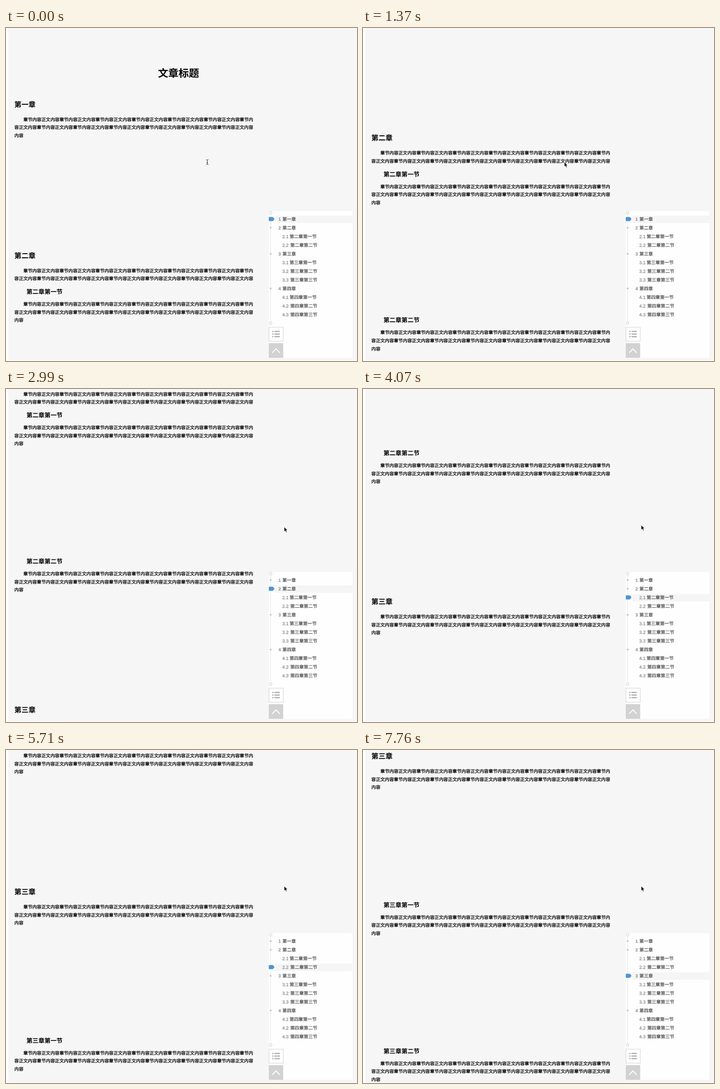
Recreate the animation shown at these times as an HTML page. Size 768 by 729 pixels, loop 8000 ms.

```html
<!DOCTYPE html>
<html lang="zh-CN">
<head>
<meta charset="utf-8">
<style>
html, body { margin: 0; width: 100%; height: 100%; overflow: hidden; background: #fff; }
svg { display: block; width: 768px; height: 729px; }
text { font-family: "Noto Sans CJK SC", "Noto Sans CJK JP", sans-serif; text-rendering: geometricPrecision; white-space: pre; }
.num { font-family: "Liberation Sans", Arial, sans-serif; }
</style>
</head>
<body>
<svg id="stage" viewBox="0 0 768 729" lang="zh-CN">
  <rect x="5" width="763" height="728" fill="#f6f6f6"/>
  <g id="page"></g>
  <rect x="575" y="401" width="183" height="321" fill="#fefefe"/>
  <g id="active">
    <rect x="589" y="-7.5" width="169" height="15.5" fill="#f5f5f5"/>
    <path d="M589 7.8H758" stroke="#ececec" stroke-width=".7"/>
  </g>
  <path d="M579 405V646" stroke="#e2e2e2"/>
  <g fill="#fff" stroke="#c8c8c8"><circle cx="579" cy="404.5" r="3"/><circle cx="579" cy="646" r="3"/></g>
  <g id="toc"></g>
  <path id="marker" d="M576 -4.5H584L587.7 0L584 4.5H576Q575 4.5 575 3.5V-3.5Q575 -4.5 576 -4.5Z" fill="#5094d5"/>
  <rect x="575.5" y="655" width="31" height="30.5" fill="#fff" stroke="#d0d0d0"/>
  <path d="M582.5 664.3h3m2 0h11.5M582.5 670h3m2 0h11.5M582.5 675.7h3m2 0h11.5" stroke="#aaa" stroke-width="2.6"/>
  <rect x="575" y="690" width="31.5" height="32" fill="#d2d2d2"/>
  <path d="M582.5 711L590.7 702.5L599 711" fill="none" stroke="#fff" stroke-width="2"/>
  <path id="beam" d="M-2.5 -5.3Q0 -5.3 0 -4Q0 -5.3 2.5 -5.3M0 -4.5V4.5M-2.5 5.3Q0 5.3 0 4Q0 5.3 2.5 5.3M-1.5 1.5H1.5" fill="none" stroke="#222"/>
  <path id="arrow" d="M0 0V10.5L2.4 8.3L4.2 12.3L6 11.5L4.3 7.6H7.6Z" fill="#000" stroke="#fff" stroke-width=".9"/>
</svg>
<script>
const LOOP = 8000, EM = 9.87, LINE = 17.6, BLANK = 228.9;
const $ = id => document.getElementById(id);

function add(parent, tag, attrs, content = '') {
  const el = document.createElementNS('http://www.w3.org/2000/svg', tag);
  for (const k in attrs) el.setAttribute(k, attrs[k]);
  el.textContent = content;
  return parent.appendChild(el);
}

// Text is placed by the vertical centre of its glyphs; regular weight gets a hairline to look fuller.
const label = (parent, x, y, size, bold, fill, str, extra) => add(parent, 'text', {
  x, y: y + size * 0.38, 'font-size': size, 'font-weight': bold ? 700 : 500,
  fill, stroke: fill, 'stroke-width': bold ? 0 : 0.3, ...extra
}, str);

const digits = '零一二三四';
const name = (c, s) => `第${digits[c]}章` + (s ? `第${digits[s]}节` : '');
const body = '章节内容正文内容'.repeat(13);
const lines = [body.slice(0, 51), body.slice(51, 104), '内容'];
const rowY = i => 418.3 + 19 * i;

// Lay out the article and its outline together, top to bottom.
const headings = [], dots = [];
let y = 167;
label($('page'), 377.5, 98, 22.5, true, '#000', '文章标题', { 'text-anchor': 'middle' });
[0, 2, 3, 3].forEach((sections, k) => {
  for (let c = k + 1, s = 0; s <= sections; s++) {
    const rowTop = rowY(headings.length);
    if (!s) dots[headings.length] = add($('toc'), 'circle', { cx: 579, cy: rowTop, r: 2.1, fill: '#c8c8c8' });
    label($('toc'), s ? 604.5 : 596, rowTop, EM, !s, '#888', s ? `${c}.${s}` : c, { class: 'num' });
    label($('toc'), s ? (s === 1 ? 620.4 : 622) : 604.8, rowTop, EM, !s, '#555', name(c, s));

    if (headings.length) y += s ? 28.4 : 34;
    headings.push(y);
    label($('page'), s ? 44.7 : 18.3, y, s ? 13.2 : 15.5, true, '#000', name(c, s));
    y += s ? 27.3 : 33;
    const short = c === 2 && !s;
    lines.slice(0, short ? 2 : 3).forEach((line, i) =>
      label($('page'), 18.3 + (i ? 0 : 2 * EM), y + i * LINE, EM, false, '#000', line));
    y += short ? LINE : 2 * LINE + BLANK;
  }
});

// Wheel gestures: each jumps in even steps to a new scroll offset.
const smooth = p => p * p * (3 - 2 * p), linear = p => p;
const gesture = (start, end, steps, to, ease = smooth) => ({ start, end, steps, to, ease });
const gestures = [
  gesture(150, 150, 1, 3), gesture(420, 830, 3, 75), gesture(1160, 1160, 1, 257.5),
  gesture(1570, 2160, 4, 415), gesture(2580, 2990, 3, 520), gesture(3290, 3530, 2, 730),
  gesture(4070, 4070, 1, 757), gesture(4480, 4900, 3, 883), gesture(5350, 5350, 1, 886),
  gesture(5710, 6420, 3, 964, linear), gesture(6810, 6810, 1, 985), gesture(7170, 7760, 4, 1209)
];

function scrollAt(t) {
  let offset = 0;
  for (const { start, end, steps, to, ease } of gestures) {
    if (t < start) break;
    const gap = (end - start) / (steps - 1) || 1;
    const done = Math.min(steps, Math.floor((t - start) / gap + 1e-6) + 1);
    offset += (to - offset) * ease(done / steps);
  }
  return offset;
}

const lerp = (a, b, p) => a + (b - a) * Math.min(1, Math.max(0, p));

function pointerAt(t) {
  const across = (t - 1770) / 600, away = (t - 2580) / 210;
  const x = lerp(lerp(440.5, 523, across), 608.7, away);
  const y = lerp(lerp(293.5, 289, across), t < 3290 ? 302 : 298, away);
  const overText = t < 1160 || (t >= 1960 && t < 2580);
  return [overText ? 'beam' : 'arrow', x, y];
}

const move = (id, x, y) => $(id).setAttribute('transform', `translate(${x} ${y})`);

function draw(now) {
  const t = now % LOOP, scroll = scrollAt(t);
  move('page', 0, -scroll);

  const current = Math.max(0, headings.findLastIndex(top => top - scroll <= 20));
  move('active', 0, rowY(current));
  move('marker', 0, rowY(current));
  dots.forEach((dot, i) => dot.setAttribute('opacity', i === current ? 0 : 1));

  const [shape, x, y] = pointerAt(t);
  for (const id of ['beam', 'arrow']) $(id).setAttribute('visibility', id === shape ? 'visible' : 'hidden');
  move(shape, x, y);
}

const start = performance.now();
function tick() {
  draw(performance.now() - start);
  requestAnimationFrame(tick);
}
tick();
</script>
</body>
</html>
```
